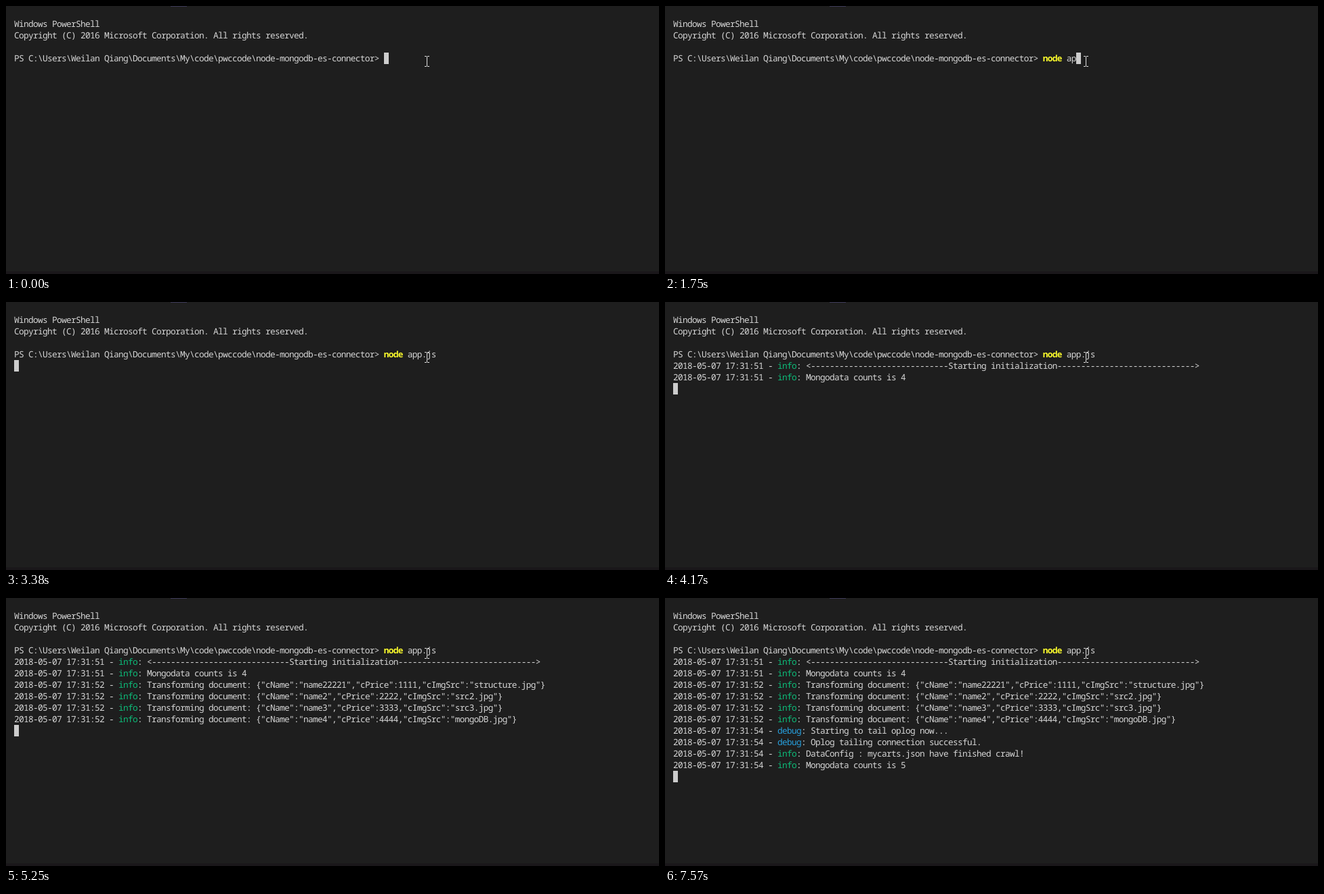
An HTML page that plays this animation: 964x397 px, repeating every 8 s.

```html
<!DOCTYPE html>
<html lang="en">
<head>
<meta charset="utf-8">
<title>Terminal session</title>
<style>
  html, body { margin: 0; width: 100%; height: 100%; overflow: hidden; background: #1e1e1e; }
  #stage { position: relative; width: 964px; height: 397px; overflow: hidden; background: #1e1e1e; }
  #stage > * { position: absolute; }
  /* 12.8px glyphs advance 7.68px; the terminal packs them into 7px cells */
  #screen {
    left: 12px; top: 18px; margin: 0; color: #d6d6d6;
    font: 500 12.8px/17px "Noto Sans Mono", monospace; letter-spacing: -.68px;
    font-variant-ligatures: none; text-rendering: geometricPrecision; white-space: pre;
  }
  .cmd { color: #fbfb2c; font-weight: 600; }
  .info { color: #0dbc79; }
  .debug { color: #279fdc; }
  #caret { left: 12px; top: 18px; width: 7px; height: 17px; background: #ccc; }
  #tab { left: 243px; top: 0; width: 24px; height: 1px; background: #3d3a58; }
  #edge { left: 0; top: 393px; width: 964px; height: 4px; background: #1a171a; }
  #pointer { left: 618px; top: 74px; mix-blend-mode: difference; }
</style>
</head>
<body>
<div id="stage">
  <div id="tab"></div>
  <div id="edge"></div>
  <pre id="screen"></pre>
  <div id="caret"></div>
  <svg id="pointer" width="7" height="16" shape-rendering="crispEdges">
    <path fill="#fff" d="M0 0h3v1h-3zM4 0h3v1h-3zM3 1h1v14h-1zM0 15h3v1h-3zM4 15h3v1h-3z"/>
  </svg>
</div>
<script>
const LOOP = 8000, CELL = 7, ROW = 17;
const screen = document.getElementById('screen');
const caret = document.getElementById('caret');

const log = (sec, level, text) => `2018-05-07 17:31:${sec} - ${level}: ${text}\n`;
const doc = (name, price, src) => log(52, 'info',
  'Transforming document: ' + JSON.stringify({ cName: name, cPrice: price, cImgSrc: src }));
const dashes = '-'.repeat(29);

const intro = 'Windows PowerShell\n' +
  'Copyright (C) 2016 Microsoft Corporation. All rights reserved.\n\n' +
  'PS C:\\Users\\Weilan Qiang\\Documents\\My\\code\\pwccode\\node-mongodb-es-connector> ';

// [time in ms, text appended]
const steps = [
  [0, intro],
  [740, 'n'], [970, 'o'], [1140, 'd'], [1290, 'e'], [1370, ' '],
  [1600, 'a'], [1750, 'p'], [1920, 'p'], [2620, '.'], [3000, 'j'], [3230, 's'],
  [3380, '\n'],
  [4090, log(51, 'info', `<${dashes}Starting initialization${dashes}>`)],
  [4170, log(51, 'info', 'Mongodata counts is 4')],
  [5170, doc('name22221', 1111, 'structure.jpg') + doc('name2', 2222, 'src2.jpg')],
  [5250, doc('name3', 3333, 'src3.jpg') + doc('name4', 4444, 'mongoDB.jpg')],
  [7500, log(54, 'debug', 'Starting to tail oplog now...') +
    log(54, 'debug', 'Oplog tailing connection successful.') +
    log(54, 'info', 'DataConfig : mycarts.json have finished crawl!')],
  [7570, log(54, 'info', 'Mongodata counts is 5')]
];

function span(cls, text) {
  const el = document.createElement('span');
  el.className = cls;
  el.textContent = text;
  return el;
}

function paint(text) {
  const parts = text.split(/((?<=connector> )n\w*|(?<= - )(?:info|debug)(?=:))/);
  screen.replaceChildren(...parts.map((part, i) =>
    i % 2 ? span(part[0] === 'n' ? 'cmd' : part, part) : part));
  const lines = text.split('\n');
  const x = lines[lines.length - 1].length * CELL, y = (lines.length - 1) * ROW;
  caret.style.transform = `translate(${x}px, ${y}px)`;
}

let shown = 0;
function tick() {
  const t = performance.now() % LOOP;
  const count = steps.filter(([at]) => at <= t).length;
  if (count !== shown) {
    shown = count;
    paint(steps.slice(0, count).map(step => step[1]).join(''));
  }
  requestAnimationFrame(tick);
}
tick();
</script>
</body>
</html>
```
